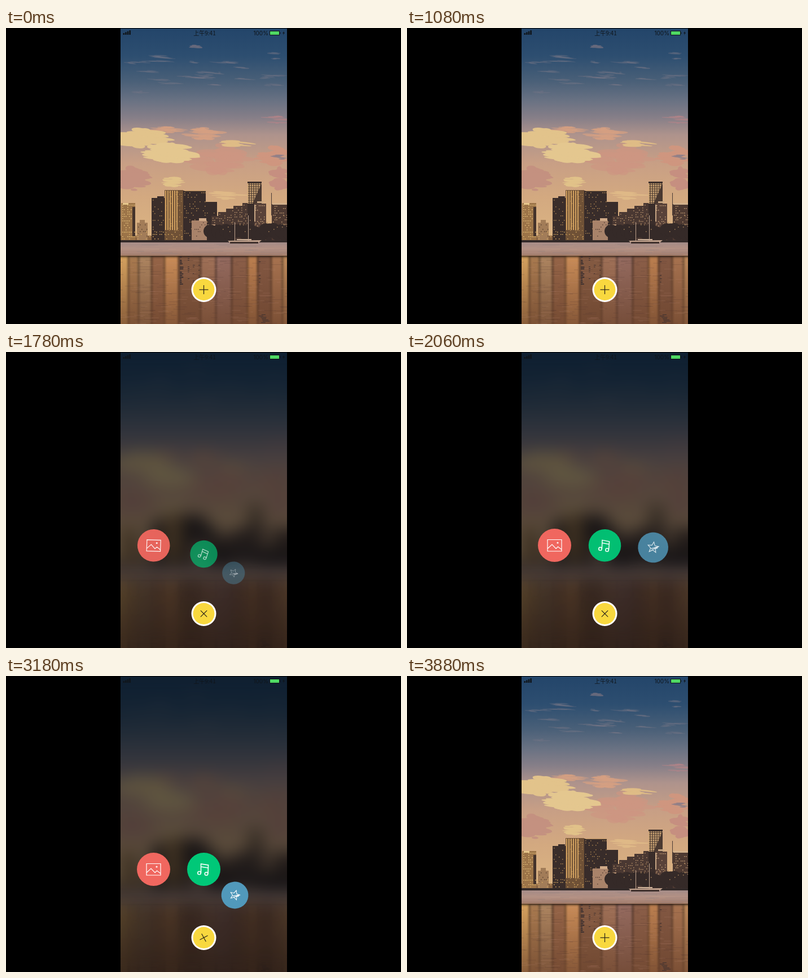
An HTML page with a canvas that plays this animation: 700x526 px, repeating every 6.02 s.

```html
<!DOCTYPE html>
<html lang="zh">
<head>
<meta charset="utf-8">
<style>
html, body { margin: 0; width: 100%; height: 100%; overflow: hidden; background: #000; }
canvas { display: block; }
</style>
</head>
<body>
<canvas id="stage" width="700" height="526"></canvas>
<script>
const W = 700, H = 526, LEFT = 203, RIGHT = 498, LOOP = 6020, STEP = 140;
const ctx = document.getElementById('stage').getContext('2d');
const clamp = v => Math.max(0, Math.min(1, v));
const easeOut = v => 1 - (1 - v) ** 2;

let seed = 7;
const rand = (a = 0, b = 1) => {
  seed = (seed * 16807) % 2147483647;
  return a + (b - a) * seed / 2147483647;
};

function layer(paint) {
  const canvas = document.createElement('canvas');
  canvas.width = W;
  canvas.height = H;
  paint(canvas.getContext('2d'));
  return canvas;
}

function rect(c, color, x, y, w, h) {
  c.fillStyle = color;
  c.fillRect(x, y, w, h);
}

function gradient(c, y0, y1, stops) {
  const g = c.createLinearGradient(0, y0, 0, y1);
  stops.forEach(([y, color]) => g.addColorStop((y - y0) / (y1 - y0), color));
  return g;
}

// A ragged cloud made of thin overlapping streaks
function cloud(c, color, x, y, w, h, count = 26) {
  c.fillStyle = color;
  for (let i = 0; i < count; i++) {
    const v = rand(-1, 1), reach = Math.sqrt(1 - v * v) * w / 2;
    c.beginPath();
    c.ellipse(x + rand(-0.6, 0.6) * reach, y + v * h / 2, reach * rand(0.35, 0.6) + 2,
      Math.max(1, h * rand(0.05, 0.14)), rand(0, 0.12), 0, 7);
    c.fill();
  }
}

function windows(c, color, x, y, w, h, density) {
  c.fillStyle = color;
  for (let v = y + 3; v < y + h - 2; v += 4)
    for (let u = x + 2; u < x + w - 1; u += 3)
      if (rand() < density) c.fillRect(u, v, 1.5, 1.5);
}

function tower(c, x, y, w, color = '#3a2d2a', density = 0.2, light = '#a9814f') {
  rect(c, color, x, y, w, 380 - y);
  windows(c, light, x, y, w, 374 - y, density);
}

function paintSky(c) {
  rect(c, gradient(c, 0, 381, [[0, '#23456a'], [50, '#2d4e70'], [95, '#4a6078'], [130, '#6a7283'],
    [160, '#877f88'], [190, '#ae938c'], [240, '#c89f85'], [300, '#d3a980'], [381, '#dcb583']]), 100, 0, 500, 381);
  for (let i = 0; i < 26; i++) {
    const y = rand(45, 122);
    cloud(c, 'rgba(125,123,136,.28)', rand(LEFT, RIGHT), y, rand(20, 70), 3, 4);
  }
  cloud(c, '#66697c', 335, 33, 28, 5, 8);
  cloud(c, 'rgba(176,132,136,.6)', 480, 163, 60, 12, 12);
  cloud(c, 'rgba(214,160,130,.7)', 350, 188, 75, 20);
  cloud(c, 'rgba(214,160,130,.6)', 285, 181, 70, 10);
  cloud(c, '#c49180', 226, 268, 64, 40);
  cloud(c, 'rgba(205,150,130,.7)', 375, 232, 120, 50);
  cloud(c, '#cf967f', 474, 228, 64, 32);
  cloud(c, '#c68f80', 482, 268, 42, 36);
  cloud(c, '#938087', 486, 229, 28, 8, 8);
  cloud(c, '#e2c38b', 238, 196, 105, 32, 40);
  cloud(c, '#e4c78f', 290, 222, 100, 32, 50);
  cloud(c, '#e1c289', 295, 273, 42, 17);
  cloud(c, '#dfbc86', 410, 206, 60, 14, 14);
  cloud(c, '#dfb987', 390, 297, 70, 14, 12);
}

function paintCity(c) {
  rect(c, '#8a6543', 100, 369, 160, 12);
  rect(c, '#372b29', 258, 360, 340, 21);
  tower(c, 204, 311, 25, '#9c7448', 0.55, '#e2bd7a');
  rect(c, '#44332b', 224, 318, 5, 52);
  rect(c, '#e6c78b', 207, 311, 10, 3);
  tower(c, 232, 346, 19, '#a27c58', 0.4, '#5a4233');
  rect(c, '#a27c58', 237, 341, 9, 6);
  tower(c, 258, 302, 23);
  rect(c, '#3a2d2a', 268, 299, 12, 4);
  tower(c, 281, 288, 33, '#6f5136', 0.2);
  for (let x = 282; x < 306; x += 4) rect(c, '#d0a05f', x, 289, 2, 70);
  tower(c, 314, 289, 40, '#382c2a', 0.22);
  rect(c, '#b58b58', 316, 289, 38, 1);
  tower(c, 354, 309, 20, '#382c2a', 0.08);
  [[364, 334], [376, 327], [390, 321], [403, 316], [419, 311]].forEach(([x, y]) =>
    tower(c, x, y, 17, '#4a3832', 0.35, '#b58f6a'));
  tower(c, 329, 342, 27, '#a9836a', 0.25, '#5a4338');
  rect(c, '#d0aa88', 342, 338, 13, 5);
  rect(c, '#c09a79', 357, 349, 14, 6);
  tower(c, 428, 273, 25, '#d0a877', 0);
  c.strokeStyle = '#46362f';
  c.lineWidth = 1.2;
  c.beginPath();
  for (let y = 278; y < 312; y += 4) { c.moveTo(429, y); c.lineTo(452, y); }
  for (let x = 431; x < 452; x += 4) { c.moveTo(x, 275); c.lineTo(x, 312); }
  c.stroke();
  rect(c, '#3b2e2a', 428, 273, 25, 3);
  c.fillStyle = '#4a3931';
  c.beginPath();
  c.moveTo(453, 276);
  c.lineTo(453, 312);
  c.lineTo(437, 312);
  c.fill();
  rect(c, '#3a2d2a', 428, 312, 25, 68);
  tower(c, 440, 312, 21, '#594239', 0.35, '#c5a07a');
  rect(c, '#c7a684', 445, 308, 11, 3);
  rect(c, '#c7a684', 440, 314, 2, 30);
  tower(c, 471, 313, 60, '#4d3931', 0.3, '#c39d75');
  rect(c, '#d2b18c', 472, 311, 26, 3);
  rect(c, '#4a3b35', 470, 293, 1, 40);
  for (let x = 362; x < 515; x += 7) {
    c.fillStyle = '#352a28';
    c.beginPath();
    c.arc(x, 363 + rand(-5, 5), 12, 0, 7);
    c.fill();
  }
  windows(c, '#a88258', 364, 330, 134, 34, 0.07);
  windows(c, '#d7a960', 204, 359, 110, 20, 0.3);
  rect(c, '#332a29', 100, 377, 500, 4);
}

function paintWater(c) {
  rect(c, gradient(c, 381, 405, [[381, '#a58c88'], [393, '#b39083'], [405, '#a07c6d']]), 100, 381, 500, 24);
  for (let i = 0; i < 45; i++)
    rect(c, rand() < 0.5 ? '#bd9c8b55' : '#8f807f66', rand(195, 490), rand(382, 403), rand(12, 55), 1);
  const stripes = [[100, '#d6a25f'], [217, '#aa7b50'], [235, '#ad8560'], [258, '#966548'], [281, '#cb8d58'],
    [306, '#855b43'], [345, '#a07158'], [372, '#956b60'], [400, '#8c5f49'], [428, '#bd8050'],
    [446, '#835843'], [470, '#a87350'], [490, '#bd895b'], [600]];
  c.save();
  c.filter = 'blur(2px)';
  stripes.slice(0, -1).forEach(([x, color], i) => rect(c, color, x, 406, stripes[i + 1][0] - x, 130));
  c.restore();
  rect(c, '#9a715a', 100, 404, 500, 1);
  rect(c, gradient(c, 404, 526, [[404, 'rgba(105,65,42,0)'], [526, 'rgba(105,65,42,.7)']]), 100, 404, 500, 122);
  for (let i = 0; i < 260; i++)
    rect(c, rand() < 0.5 ? 'rgba(70,45,45,.2)' : 'rgba(190,140,120,.2)', rand(190, 495), rand(407, 525), rand(4, 25), 1);
  c.fillStyle = '#3d302f';
  for (let y = 406; y < 456; y += 3) {
    if (rand() < 0.8) c.fillRect(308, y, rand(3, 7), 2);
    for (const x of [322, 331, 341, 448]) if (rand() < 0.55) c.fillRect(x, y, rand(2, 4), 1);
  }
  for (let i = 0; i < 7; i++) rect(c, '#3d302f', rand(445, 455), 509 + i * 2.3, rand(5, 14), 1);
}

function paintBoat(c) {
  c.fillStyle = '#c4a48f';
  c.beginPath();
  c.moveTo(393, 378);
  c.lineTo(453, 377);
  c.lineTo(446, 383);
  c.lineTo(398, 383);
  c.fill();
  rect(c, '#40312d', 397, 380, 50, 3);
  rect(c, '#d0b49b', 409, 375, 26, 2);
  rect(c, '#bfa28c', 405, 345, 1, 34);
  rect(c, '#bfa28c', 429, 333, 1, 45);
}

const scene = layer(c => [paintSky, paintCity, paintWater, paintBoat].forEach(paint => paint(c)));
const dimmed = layer(c => {
  c.filter = 'blur(14px)';
  c.drawImage(scene, 0, 0);
  c.filter = 'none';
  rect(c, 'rgba(0,4,8,.58)', 0, 0, W, H);
});

function line(...points) {
  points.forEach(([x, y], i) => i ? ctx.lineTo(x, y) : ctx.moveTo(x, y));
}

function ring(x, y, r) {
  ctx.moveTo(x + r, y);
  ctx.arc(x, y, r, 0, 7);
}

function pictureIcon() {
  ctx.rect(-12.5, -10, 25, 20.5);
  line([-12.5, 6], [-4.5, -1.5], [2.5, 6], [6, 2.5], [12.5, 7.5]);
  ring(5.5, -4.5, 1);
}

function musicIcon() {
  ctx.lineWidth = 1.6;
  ring(-8, 6.5, 2.8);
  ring(4.5, 8, 2.8);
  line([-5, 6.5], [-5, -9.5], [8, -7.5], [7.5, 8]);
  line([-5, -4.5], [8, -2.5]);
}

function starIcon() {
  for (let i = 0; i < 10; i++) {
    const a = i * Math.PI / 5, r = i % 2 ? 5 : 11;
    ctx[i ? 'lineTo' : 'moveTo'](r * Math.sin(a), -r * Math.cos(a));
  }
  ctx.closePath();
  line([-4, 3], [11, -4], [1, 3], [9, 0]);
}

const HUB = { x: 350.5, y: 465 };
const items = [
  { x: 261.5, color: '#f0675f', icon: pictureIcon, opens: 1191, closes: 3444 },
  { x: 350.5, color: '#00c878', icon: musicIcon, opens: 1478, closes: 3240 },
  { x: 439, color: '#5199bb', icon: starIcon, opens: 1628, closes: 3040 }
];

function drawItem({ x, color, icon, opens, closes }, t) {
  const closing = t > closes;
  const p = closing ? clamp(1 - (t - closes) / 370) : easeOut(clamp((t - opens) / 750));
  if (!p) return;
  const travel = closing ? p : easeOut(p), size = 0.5 + p / 2;
  ctx.save();
  ctx.globalAlpha = closing ? clamp(p * 3) : p;
  ctx.translate(HUB.x + (x - HUB.x) * travel, HUB.y - 121.5 * travel);
  ctx.rotate((1 - p) * Math.PI / 4);
  ctx.scale(size, size);
  disc(0, 0, 29.5, color);
  ctx.strokeStyle = '#fff';
  ctx.lineWidth = 1.2;
  ctx.beginPath();
  icon();
  ctx.stroke();
  ctx.restore();
}

function disc(x, y, r, color) {
  ctx.fillStyle = color;
  ctx.beginPath();
  ctx.arc(x, y, r, 0, 7);
  ctx.fill();
}

function drawHub(t) {
  const turn = easeOut(clamp((t - 1300) / 500)) - clamp((t - 3040) / 380);
  disc(HUB.x, HUB.y, 22, '#fff');
  disc(HUB.x, HUB.y, 19, '#f8d83f');
  ctx.save();
  ctx.translate(HUB.x, HUB.y);
  ctx.rotate(-turn * Math.PI / 4);
  rect(ctx, '#29231a', -8, -0.6, 16, 1.2);
  rect(ctx, '#29231a', -0.6, -8, 1.2, 16);
  ctx.restore();
}

function drawStatus() {
  const ink = '#10151a';
  for (let i = 0; i < 4; i++) rect(ctx, ink, 207.5 + i * 3.6, 9 - i * 1.6, 2.6, 3 + i * 1.6);
  ctx.fillStyle = ink;
  ctx.textBaseline = 'middle';
  ctx.font = '500 10px "Noto Sans CJK SC", "Noto Sans CJK", sans-serif';
  ctx.textAlign = 'center';
  ctx.fillText('上午9:41', 352, 9);
  ctx.font = '10px Inter, sans-serif';
  ctx.textAlign = 'right';
  ctx.fillText('100%', 465, 9.5);
  rect(ctx, ink, 467, 5, 18, 8);
  rect(ctx, '#4fd964', 468, 6, 16, 6);
  rect(ctx, ink, 485.5, 7.5, 1, 3);
  ctx.fillStyle = ink;
  ctx.beginPath();
  line([493, 5], [490, 9.5], [492, 9.5], [491, 13], [494, 8], [492, 8]);
  ctx.fill();
}

function draw(t) {
  const dim = t < 3880 ? clamp((t - 1080) / 280) : 0;
  rect(ctx, '#000', 0, 0, W, H);
  ctx.save();
  ctx.beginPath();
  ctx.rect(LEFT, 1, RIGHT - LEFT, H - 1);
  ctx.clip();
  ctx.drawImage(scene, 0, 0);
  ctx.globalAlpha = dim;
  ctx.drawImage(dimmed, 0, 0);
  ctx.globalAlpha = 1;
  drawStatus();
  [...items].reverse().forEach(item => drawItem(item, t));
  drawHub(t);
  ctx.restore();
}

// The picture moves in 140 ms steps and rests for one step while closing
function frame(now) {
  let t = 100 + STEP * Math.floor((now % LOOP - 100) / STEP);
  if (t === 3320) t -= STEP;
  draw(t);
  requestAnimationFrame(() => frame(performance.now()));
}
frame(performance.now());
</script>
</body>
</html>
```
